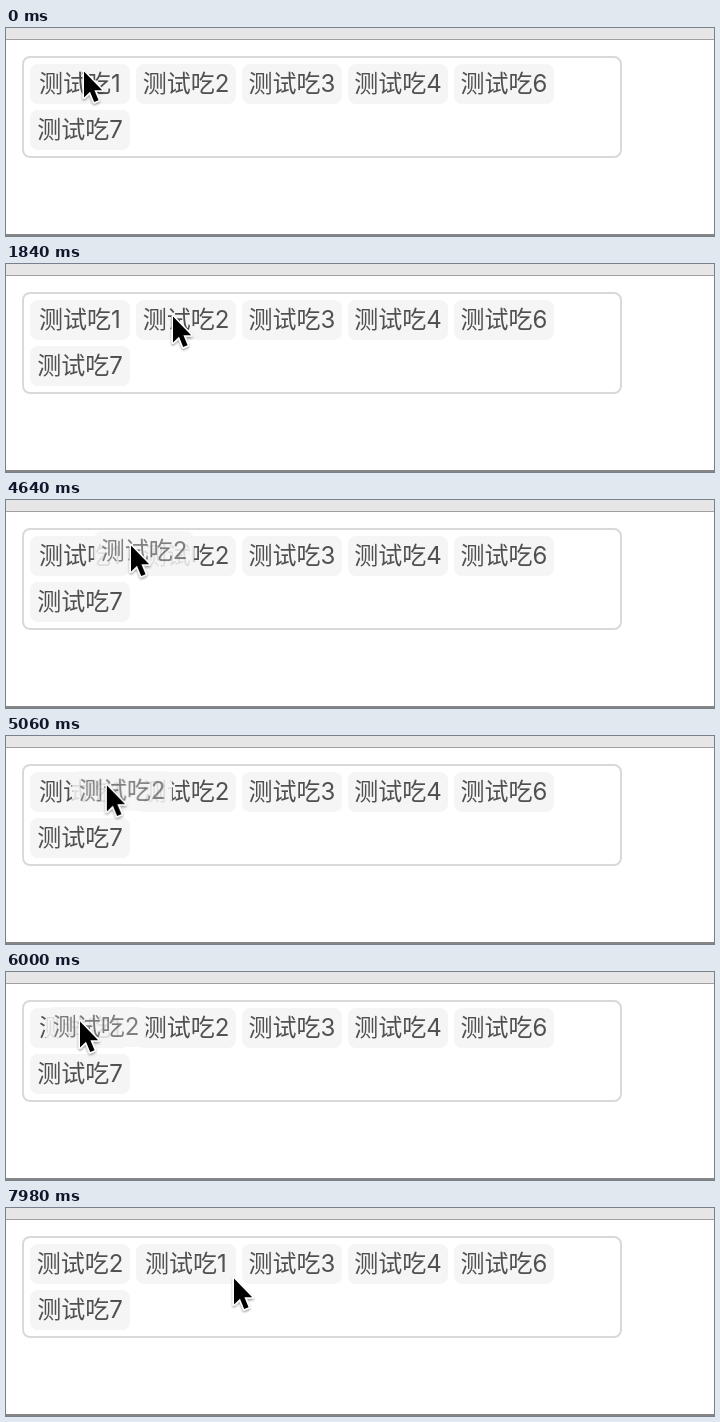
An HTML page for the animation above (8000 ms loop, 708x208 px).

```html
<!DOCTYPE html>
<html lang="zh-CN">
<head>
<meta charset="utf-8">
<title>拖动排序</title>
<style>
  html, body { margin: 0; width: 100%; height: 100%; overflow: hidden; background: #fff; }
  svg { display: block; width: 708px; height: 208px; }
  text {
    font: 400 24px Inter, "Noto Sans CJK SC", "Noto Sans CJK", sans-serif;
    fill: #505050;
    text-anchor: middle;
  }
  .cursor { animation: point 8s linear infinite; }
  .ghost { animation: drag 8s linear infinite, show 8s step-end infinite; }
  .before { animation: leave 8s step-end infinite; }
  .after { animation: enter 8s step-end infinite; }
  .ghost rect { opacity: .86; }
  .ghost text { opacity: .72; }

  @keyframes point {
    0%, .25% { transform: translate(77px, 42px); }
    9%, 10.5% { transform: translate(122px, 44px); }
    19.25%, 21% { transform: translate(168px, 51px); }
    23% { transform: translate(166px, 51px); }
    30%, 31.25% { transform: translate(166px, 53px); }
    38.5%, 45.5% { transform: translate(162px, 51px); }
    54.5%, 56% { transform: translate(119px, 50px); }
    58% { transform: translate(124px, 44px); }
    64.75%, 68.5% { transform: translate(93px, 49px); }
    71.5% { transform: translate(90px, 49px); }
    75%, 82.5% { transform: translate(73px, 48px); }
    86%, 96% { transform: translate(72px, 49px); }
    99.75%, 100% { transform: translate(227px, 69px); }
  }
  @keyframes drag {
    0%, 45.5% { transform: translate(130px, 36px); }
    54.5%, 56% { transform: translate(85px, 36px); }
    58% { transform: translate(88px, 31px); }
    64.75%, 68.5% { transform: translate(60px, 36px); }
    71.5% { transform: translate(58px, 36px); }
    75%, 100% { transform: translate(40px, 35px); }
  }
  @keyframes show {
    0% { opacity: 0; }
    46.25% { opacity: 1; }
    83.5%, 100% { opacity: 0; }
  }
  @keyframes leave {
    0% { opacity: 1; }
    83.5%, 100% { opacity: 0; }
  }
  @keyframes enter {
    0% { opacity: 0; }
    83.5%, 100% { opacity: 1; }
  }
</style>
</head>
<body>
<svg viewBox="0 0 708 208">
  <defs>
    <rect id="tag" width="100" height="40" rx="8" fill="#f5f5f5"/>
    <filter id="shade" x="-50%" y="-30%" width="200%" height="170%">
      <feDropShadow dx="0" dy="1.5" stdDeviation="1.3" flood-color="#000" flood-opacity=".4"/>
    </filter>
  </defs>

  <rect width="708" height="11" fill="#e6e6e6"/>
  <rect y="11" width="708" height="1" fill="#a0a0a0"/>
  <rect y="206" width="708" height="2" fill="#858585"/>
  <rect x="17" y="29" width="598" height="100" rx="7" fill="#fff" stroke="#d9d9d9" stroke-width="2"/>

  <use href="#tag" x="24" y="36"/>
  <use href="#tag" x="130" y="36"/>
  <use href="#tag" x="236" y="36"/>
  <use href="#tag" x="342" y="36"/>
  <use href="#tag" x="448" y="36"/>
  <use href="#tag" x="24" y="82"/>

  <g class="before">
    <text x="74" y="64">测试吃1</text>
    <text x="180" y="64">测试吃2</text>
  </g>
  <g class="after">
    <text x="74" y="64">测试吃2</text>
    <text x="180" y="64">测试吃1</text>
  </g>
  <text x="286" y="64">测试吃3</text>
  <text x="392" y="64">测试吃4</text>
  <text x="498" y="64">测试吃6</text>
  <text x="74" y="110">测试吃7</text>

  <g class="ghost">
    <use href="#tag" opacity=".86"/>
    <text x="50" y="28">测试吃2</text>
  </g>

  <g class="cursor">
    <path d="M1 1.5V27.5L7 21.8L11.2 32L15.6 30.2L11.4 20.2H19.2Z" fill="#000" stroke="#fff"
      stroke-width="3" stroke-linejoin="round" paint-order="stroke" filter="url(#shade)"/>
  </g>
</svg>
</body>
</html>
```
